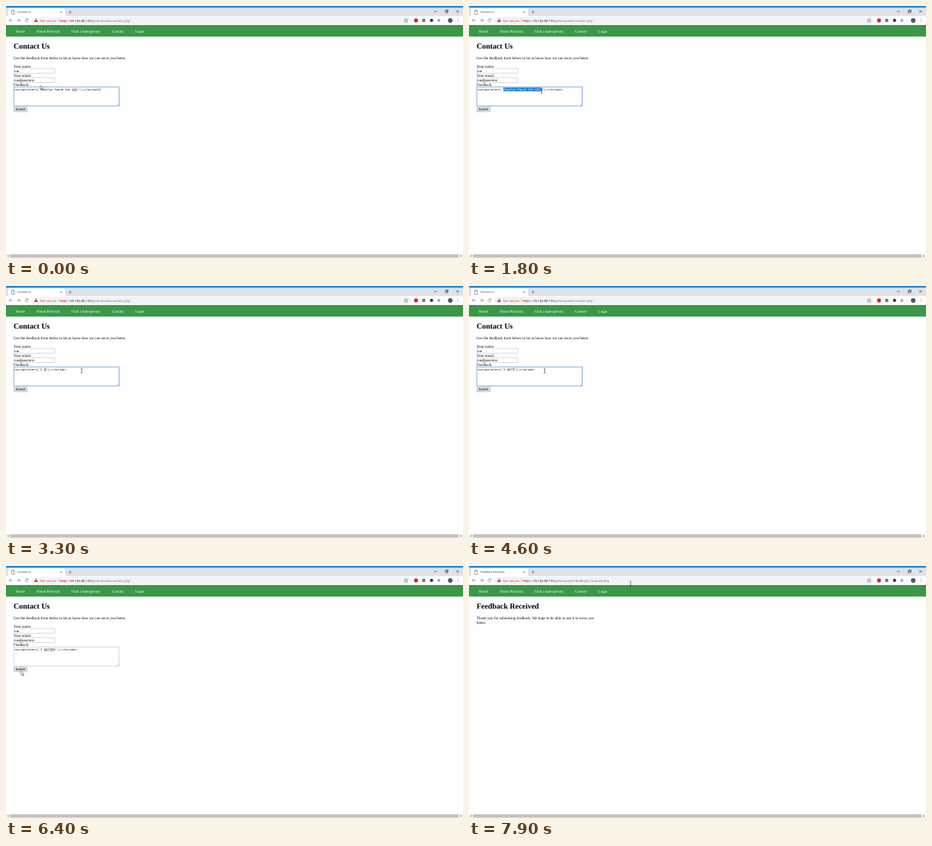
Write an HTML page that moves like this. It is 600 by 331 pixels and loops after 8000 ms.

```html
<!DOCTYPE html>
<html lang="en">
<head>
<meta charset="utf-8">
<title>Contact form</title>
<style>
  html, body { margin: 0; height: 100%; overflow: hidden; background: #fff; }
  svg { display: block; width: 100vw; height: 100vh; }
  text { white-space: pre; text-rendering: geometricPrecision; font: 5px "Liberation Serif", serif; }
  .ui text { font: 4.2px "Open Sans", sans-serif; }
  .ui .tab { font-size: 3.6px; fill: #333; }
  .field text { font: 4.17px "Liberation Sans", sans-serif; }
  .h1 { font-size: 10px; font-weight: bold; }
  #code { font: 3.82px "Liberation Mono", monospace; }
  .icon { fill: none; stroke: #5f6368; stroke-width: .6; }
  .field rect { fill: #fff; stroke: #aaa; stroke-width: .45; }
</style>
</head>
<body>
<svg viewBox="0 0 600 331">
  <rect width="600" height="331" fill="#fff"/>

  <g class="ui">
    <rect width="600" height="13.5" fill="#dee1e6"/>
    <rect width="600" height="2.2" fill="#1f86d2"/>
    <path d="M1 13.5q2 0 2-2V5.2q0-2 2-2h70.5q2 0 2 2v6.3q0 2 2 2z" fill="#fff"/>
    <path id="favicon" class="icon" d="M7.3 5.3h2.2l1.5 1.5v4h-3.7zM9.4 5.4v1.6h1.5"/>
    <path id="spinner" class="icon" d="M0-2.3A2.3 2.3 0 1 1-2.3 0" style="stroke:#4a7fd0"/>
    <text id="tab" class="tab" x="14.8" y="9.3"></text>
    <path class="icon" d="M71.3 6.8l2.4 2.4m0-2.4l-2.4 2.4M82.3 8h3.8m-1.9-1.9v3.8"/>
    <path class="icon" d="M562.2 7.3h3.6M576.8 6.3h2.6v2.6h-2.6zM577.7 6.2v-.9h2.6v2.6h-.9M591.2 5.6l3 3m0-3l-3 3" stroke-width=".5" style="stroke:#222"/>

    <rect y="13.5" width="600" height="11.5" fill="#fff"/>
    <rect x="33" y="14.3" width="499" height="9.4" rx="4.7" fill="#f1f3f4"/>
    <path class="icon" d="M8.6 18.8H4.4m2-2l-2 2 2 2M14.4 18.8h4.2m-2-2l2 2-2 2M28.6 17.6A2 2 0 1 0 29 19.4M29 16.4v1.6h-1.6"/>
    <path d="M39.5 16.3l2.6 4.7h-5.2z" fill="#d93025"/>
    <path d="M39.5 17.9v1.4m0 .5v.5" stroke="#fff" stroke-width=".5"/>
    <text x="44.6" y="20.5" fill="#d93025">Not secure</text>
    <path d="M68.1 16.4v5" stroke="#bbb" stroke-width=".4"/>
    <text x="70.2" y="20.5" fill="#6b6f73"><tspan fill="#d93025" text-decoration="line-through">https</tspan>://<tspan fill="#202124">35.184.88.145</tspan><tspan id="path"></tspan></text>
    <path class="icon" d="M525.3 16.4l.8 1.7 1.8.2-1.3 1.2.4 1.9-1.7-1-1.7 1 .4-1.9-1.3-1.2 1.8-.2z" stroke-width=".4"/>
    <circle cx="538.3" cy="18.9" r="2.6" fill="#d6222b"/>
    <rect x="546.5" y="16.8" width="3.9" height="4.2" fill="#777"/>
    <circle cx="558.7" cy="18.9" r="2.1" fill="#333"/>
    <circle cx="568.3" cy="18.9" r="2" fill="#a5a9ad"/>
    <path d="M575.3 16v6" stroke="#d5d5d5" stroke-width=".4"/>
    <circle cx="583.2" cy="18.9" r="3" fill="#50565c"/>
    <path d="M593.3 16.9v.7m0 .9v.7m0 .9v.7" stroke="#5f6368" stroke-width=".8"/>
  </g>

  <rect y="25" width="600" height="15.2" fill="#3a9848"/>
  <g fill="#fff">
    <text x="12.7" y="34.5">Home</text>
    <text x="39.8" y="34.5">About Plenvora</text>
    <text x="86.1" y="34.5">Find a Salesperson</text>
    <text x="139" y="34.5">Contact</text>
    <text x="169.6" y="34.5">Login</text>
  </g>

  <g id="contact">
    <text class="h1" x="10" y="56.2">Contact Us</text>
    <text x="10" y="70">Use the feedback form below to let us know how we can serve you better.</text>
    <text x="10" y="80.5">Your name:</text>
    <text x="10" y="92.6">Your email:</text>
    <text x="10" y="104.7">Feedback:</text>
    <g class="field">
      <rect x="10.2" y="82" width="53.8" height="6.1"/>
      <text x="11.2" y="86.5">me</text>
      <rect x="10.2" y="94.1" width="53.8" height="6.1"/>
      <text x="11.2" y="98.6">me@post.test</text>
      <rect id="area" x="10.2" y="106.2" width="138.4" height="25"/>
      <path d="M146 130.7l2.1-2.1m-1 2.1l1-1" stroke="#777" stroke-width=".35"/>
      <rect x="10.2" y="132.9" width="17.8" height="6.1" style="fill:#dedede"/>
      <text x="12.5" y="137.4">Submit</text>
    </g>
    <rect id="selection" y="107.2" height="4.8" fill="#1f7fe0"/>
    <text id="code" x="10.9" y="110.9"><tspan></tspan><tspan fill="#fff"></tspan><tspan></tspan></text>
    <path id="squiggle" stroke="#e0392f" stroke-width=".45"/>
    <path id="caret" stroke="#000" stroke-width=".4"/>
  </g>

  <g id="received">
    <text class="h1" x="10" y="56.2">Feedback Received</text>
    <text x="10" y="70">Thank you for submitting feedback. We hope to be able to use it to serve you</text>
    <text x="10" y="75.6">better.</text>
  </g>

  <rect y="325.7" width="600" height="5.3" fill="#f1f1f1"/>
  <rect x="5.3" y="326.2" width="588.7" height="4.2" fill="#c1c1c1"/>
  <path d="M3.3 327l-1.4 1.3 1.4 1.3zM596.7 327l1.4 1.3-1.4 1.3z" fill="#555"/>

  <path id="arrow" d="M0 0v5.4l1.3-1.2.9 2 .9-.4-.9-1.9h1.7z" fill="#fff" stroke="#000" stroke-width=".4"/>
  <path id="beam" d="M-1.1-2.8h.8l.3.3.3-.3h.8M0-2.5v5M-1.1 2.8h.8l.3-.3.3.3h.8" fill="none" stroke="#111" stroke-width=".55"/>
</svg>
<script>
const $ = id => document.getElementById(id);
const show = (id, on) => $(id).style.display = on ? '' : 'none';

const LOOP = 8000, CLICK = 6300, LOADING = 6500, LOADED = 7000, READY = 7400;
const LEFT = 10.9, CHAR = 3.82 * 0.6;
const PREFIX = "<script>alert('", SUFFIX = "');<\/script>";
const OLD = 'Jocelyn found the XSS!', NEW = 'I GOTTEM!';
const keyTimes = [2700, 3000, 3300, 3600, 3900, 4200, 4800, 5000, 5200];

// time, x, y
const route = [
  [0, 45.3, 104.3], [300, 38, 100], [700, 48, 111], [900, 48, 110], [1100, 53, 111],
  [1200, 68.4, 112.2], [1900, 97, 112], [2100, 99.3, 111.4], [5600, 99.3, 111.4],
  [6200, 19.8, 138.2], [READY, 19.8, 138.2], [7900, 212, 23.3], [LOOP, 212, 23.3]
];

const columnX = column => LEFT + column * CHAR;

function mouseAt(t) {
  const i = route.findIndex(p => p[0] > t);
  const [t0, x0, y0] = route[i - 1], [t1, x1, y1] = route[i];
  const k = (t - t0) / (t1 - t0), ease = k * k * (3 - 2 * k);
  return [x0 + (x1 - x0) * ease, y0 + (y1 - y0) * ease];
}

// Dragging after a double click takes each word once its middle is passed.
function selectedLength(t, x) {
  if (t < 1100 || t >= keyTimes[0]) return 0;
  let length = 7;
  for (const word of OLD.matchAll(/\S+/g)) {
    const end = word.index + word[0].length;
    if (x > columnX(PREFIX.length + (word.index + end) / 2)) length = Math.max(length, end);
  }
  return length;
}

function drawCode(t, x) {
  const start = PREFIX.length;
  const typed = keyTimes.filter(k => k <= t).length;
  const message = typed ? NEW.slice(0, typed) : OLD;
  const selected = selectedLength(t, x);
  const parts = [PREFIX, message.slice(0, selected), message.slice(selected) + SUFFIX];
  parts.forEach((part, i) => $('code').children[i].textContent = part);

  $('selection').setAttribute('x', columnX(start));
  $('selection').setAttribute('width', selected * CHAR);

  const [from, length] = typed ? [2, 6] : [18, 3];
  show('squiggle', !typed || typed === NEW.length);
  $('squiggle').setAttribute('d', `M${columnX(start + from)} 111.9h${length * CHAR}`);

  const lastKey = typed ? keyTimes[typed - 1] : 0;
  const column = start + message.length + (typed ? 0 : SUFFIX.length);
  show('caret', !selected && t < CLICK && (t - lastKey) % 1000 < 500);
  $('caret').setAttribute('d', `M${columnX(column)} 107.4v4.6`);
}

function draw(now) {
  const t = Math.floor(now % LOOP / 100) * 100;
  const [x, y] = mouseAt(t);
  const loaded = t >= LOADED, loading = t >= LOADING && t < READY;
  const overText = loaded ? y < 24 : y > 106 && y < 131;

  show('contact', !loaded);
  show('received', loaded);
  $('tab').textContent = loaded ? 'Feedback Received' : 'Contact Us';
  $('path').textContent = `/green/public/${loaded ? 'feedback_received' : 'contact'}.php`;
  show('favicon', !loading);
  show('spinner', loading);
  $('spinner').setAttribute('transform', `translate(9.2 8) rotate(${(t - LOADING) * .36})`);

  const focused = t < CLICK;
  $('area').style.stroke = focused ? '#5b93dc' : '#aaa';
  $('area').style.strokeWidth = focused ? .75 : .45;
  drawCode(t, x);

  show('arrow', !overText);
  show('beam', overText);
  $(overText ? 'beam' : 'arrow').setAttribute('transform', `translate(${x} ${y})`);
}

const begin = performance.now();
function tick() {
  draw(performance.now() - begin);
  requestAnimationFrame(tick);
}
tick();
</script>
</body>
</html>
```
